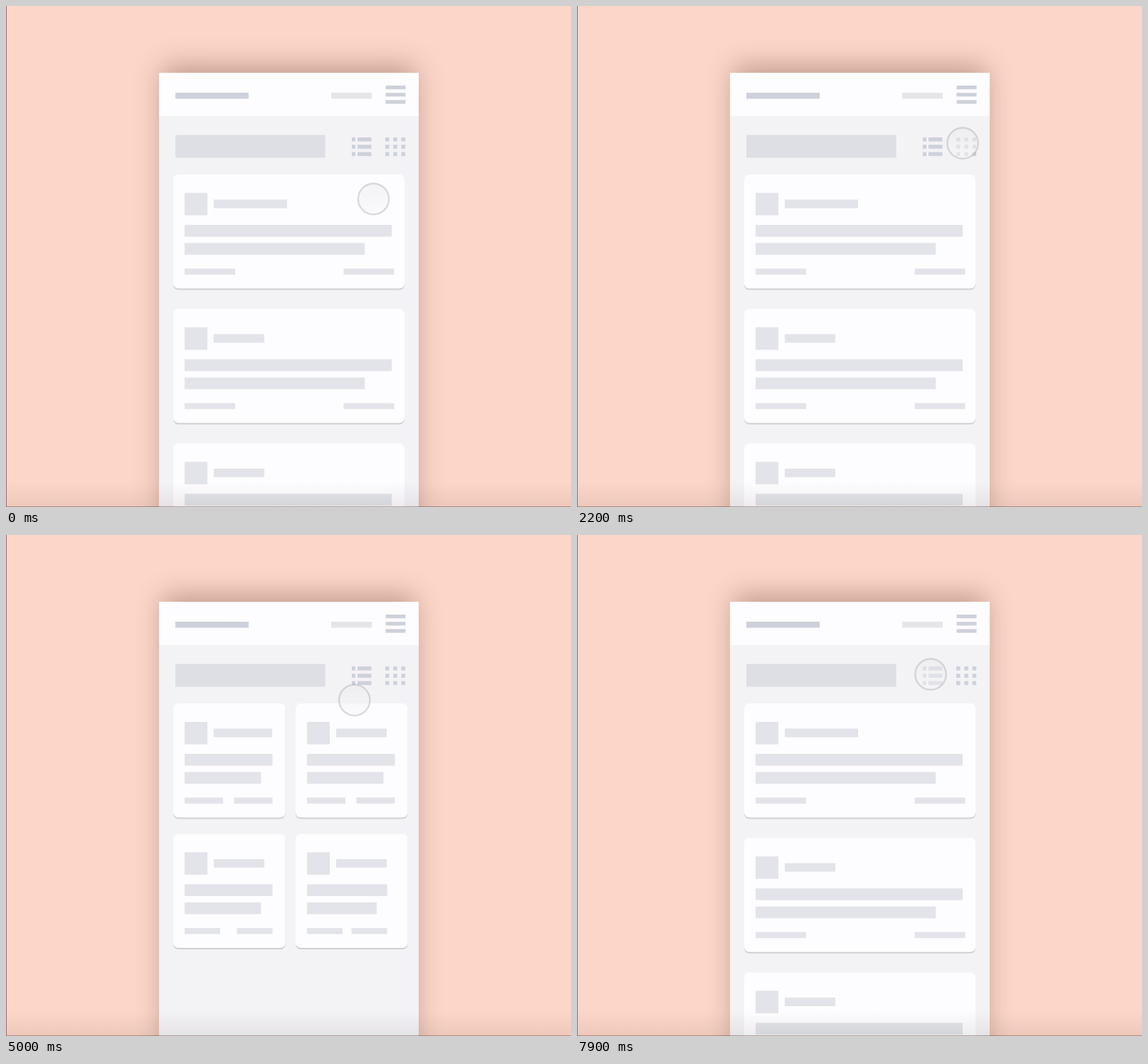
Write an HTML page with a canvas that moves like this. It is 794 px wide and 705 px high and loops after 8 s.

```html
<!DOCTYPE html>
<html lang="en">
<head>
<meta charset="utf-8">
<title>Mobile wireframe</title>
<style>
html, body { margin: 0; width: 100%; height: 100%; overflow: hidden; background: #fcd6c8; }
canvas { display: block; }
</style>
</head>
<body>
<canvas id="stage" width="794" height="705"></canvas>
<script>
const W = 794, H = 705, LOOP = 8000, STEP = 100;
const ctx = document.getElementById('stage').getContext('2d');
const WHITE = '#fdfcfe', SCREEN = '#f3f2f5', BAR = '#e2e4e9', DARK = '#cdd1db', BLOCK = '#dddfe4', MID = '#d1d4db';
const PHONE = { x: 215, y: 94, w: 365 }, MARGIN = 235, FULL = 325, HALF = 157.5;

// Places the pointer visits, and when it travels there
const START = { x: 516.5, y: 271.5 }, MENU = { x: 549, y: 131 }, CARD = { x: 333, y: 257 };
const GRID_ICON = { x: 542, y: 193 }, LIST_ICON = { x: 505.5, y: 193 }, LIST_EDGE = { x: 497, y: 196 };
const MOVES = [
  { from: 400, to: 800, spot: MENU },
  { from: 1800, to: 2200, spot: GRID_ICON },
  { from: 3100, to: 3600, spot: LIST_ICON },
  { from: 4000, to: 4400, spot: GRID_ICON },
  { from: 4700, to: 5600, spot: CARD, arc: 33 },
  { from: 6300, to: 7500, spot: LIST_EDGE }
];
const TAPS = [900, 2500, 4400, 7600];

const lerp = (a, b, p) => a + (b - a) * p;
const span = (t, a, b) => Math.min(1, Math.max(0, (t - a) / (b - a)));
const ease = (t, a, b) => (1 - Math.cos(Math.PI * span(t, a, b))) / 2;
const easeOut = (t, a, b) => 1 - (1 - span(t, a, b)) ** 3;

function rect(x, y, w, h, color) {
  ctx.fillStyle = color;
  ctx.fillRect(x, y, w, h);
}

function shade(y, h, from, to) {
  const g = ctx.createLinearGradient(0, y, 0, y + h);
  g.addColorStop(0, from);
  g.addColorStop(1, to);
  return g;
}

function clipped(x, y, w, h, draw) {
  ctx.save();
  ctx.beginPath();
  ctx.rect(x, y, w, h);
  ctx.clip();
  draw();
  ctx.restore();
}

function rounded(x, y, w, h, color) {
  ctx.fillStyle = color;
  ctx.beginPath();
  ctx.roundRect(x, y, w, h, 7);
  ctx.fill();
}

function background() {
  rect(0, 0, W, H, '#fcd6c8');
  ctx.save();
  ctx.shadowColor = 'rgba(85,50,35,.38)';
  ctx.shadowBlur = 36;
  ctx.shadowOffsetY = -8;
  rect(PHONE.x + 6, PHONE.y, PHONE.w - 12, H, SCREEN);
  ctx.restore();
}

// Two lines of text, the second a little shorter
function lines(x, y, w, color) {
  rect(x, y, w, 16.5, color);
  rect(x, y + 25.5, w * .87, 16.5, color);
}

function card(x, y, w, name, inner, foot, footEnd) {
  rounded(x, y + 2, w, 160.5, '#cfd0d5');
  rounded(x, y, w, 160.5, WHITE);
  const left = x + 16;
  rect(left, y + 26, 32, 31.5, BAR);
  rect(left + 41, y + 35.5, name, 12, BAR);
  lines(left, y + 71, inner, BAR);
  rect(left, y + 132.5, foot, 8.5, BAR);
  rect(left + footEnd - foot, y + 132.5, foot, 8.5, BAR);
}

// Left cards shrink to half width while the right column slides in
function cards(grid, reading) {
  for (let col = 0; col < 2; col++) {
    for (let row = 0; row < 3 - col; row++) {
      const x = MARGIN + col * (172 + 193 * (1 - grid) + 190 * reading);
      const y = 237 + row * lerp(189.25, 183.5, grid) + (row > 1 ? 120 * grid : 0);
      const w = col ? HALF : lerp(FULL, HALF, grid);
      const inner = w - 34 - 11 * row * col;
      const name = row + col ? 71 : lerp(103, 82, grid);
      const foot = lerp(71, 54 - 4 * row, grid);
      card(x, y, w, name, inner, foot, inner + 3.5 * (1 - grid));
    }
  }
}

function toolbar() {
  rect(238, 181.5, 210.5, 32, BLOCK);
  for (let row = 0; row < 3; row++) {
    const y = 185 + row * 10.3;
    rect(486, y, 5, 5.5, DARK);
    rect(494, y, 19.5, 5.5, DARK);
    for (let col = 0; col < 3; col++) rect(533 + col * 11.3, y, 5.5, 5.5, DARK);
  }
}

function article(alpha, heroWidth) {
  const left = MARGIN + 16, text = '#dfe3e8';
  ctx.globalAlpha = alpha;
  rect(MARGIN, 177.5, FULL, H, WHITE);
  clipped(MARGIN, 177.5, heroWidth, 170, () => {
    rect(MARGIN, 177.5, FULL, 170, BAR);
    lines(left, 288, 291, WHITE);
  });
  rect(left, 374, 103, 8.5, text);
  for (let i = 0; i < 8; i++) {
    const indent = 2 - Math.abs(2 - i % 4);
    rect(left, 405 + i * 24.5, 291 - 9.6 * indent, 16.5, text);
  }
  rect(303, 637, 191.5, 47.5, MID);
  rect(327, 655.5, 147.5, 11.5, WHITE);
  ctx.globalAlpha = 1;
}

function menu(open) {
  const { x, y, w } = PHONE, bottom = 155 + 559 * open;
  rect(x, 155, w, H, `rgba(60,60,70,${.11 * open})`);
  rect(x, bottom, w, 11, shade(bottom, 11, 'rgba(60,60,65,.22)', 'rgba(60,60,65,0)'));
  clipped(x, y, w, bottom - y, () => {
    rect(x, y, w, H, '#faf9fc');
    for (let i = 0; i < 4; i++) {
      rect(238, 167 + i * 63.9, 315 + 7 * Math.cos(1.45 * i), 54.5, BLOCK);
      rect(239.5 + i * 48.2, 429, 31, 26, MID);
    }
  });
}

// The three bars turn into a cross as the menu opens
function menuIcon(open) {
  const turn = Math.min(1, open / .93);
  for (const side of [-1, 0, 1]) {
    ctx.save();
    ctx.translate(547.5, 124.8 + side * 10.2 * (1 - turn));
    ctx.rotate(-side * turn * .72);
    const w = side ? 28 + 9 * turn : 28 * (1 - turn);
    rect(-w / 2, -2.6, w, 5.2, DARK);
    ctx.restore();
  }
}

function pointer(t) {
  let { x, y } = START, r = 21.7;
  for (const { from, to, spot, arc = 0 } of MOVES) {
    const p = ease(t, from, to);
    x = lerp(x, spot.x, p);
    y = lerp(y, spot.y, p) + arc * Math.sin(Math.PI * p);
  }
  for (const tap of TAPS) r *= 1 - .1 * Math.sin(Math.PI * span(t, tap, tap + 300));
  ctx.beginPath();
  ctx.arc(x, y, r, 0, 7);
  ctx.fillStyle = shade(y - r, 2 * r, 'rgba(234,234,236,.5)', 'rgba(248,248,249,.5)');
  ctx.fill();
  ctx.strokeStyle = 'rgba(150,150,154,.33)';
  ctx.lineWidth = 2.4;
  ctx.stroke();
}

function draw(t) {
  const grid = t < 3900 ? ease(t, 2500, 3000) : ease(t, 4400, 4800) - ease(t, 7600, 7900);
  const reading = ease(t, 5400, 5800) - ease(t, 6500, 7100);
  const open = easeOut(t, 900, 1400) - ease(t, 1600, 2100);
  const { x, y, w } = PHONE;

  background();
  clipped(x, y, w, H, () => {
    rect(x, y, w, H, SCREEN);
    ctx.globalAlpha = 1 - reading;
    toolbar();
    cards(grid, reading);
    ctx.globalAlpha = 1;
    if (reading > 0) article(reading, lerp(HALF, FULL, span(t, 5600, 5900)));
    rect(x, y, w, 61, WHITE);
    rect(457, 122, 57, 8.5, '#e5e6ea');
    if (open > 0) menu(open);
    rect(238, 122, 103, 8.5, DARK);
    menuIcon(open);
  });
  pointer(t);

  rect(0, 670, W, 35, shade(670, 35, 'rgba(60,45,40,0)', 'rgba(60,45,40,.08)'));
  rect(0, H - 1, W, 1, 'rgba(80,40,30,.4)');
  rect(0, 0, 1, H, '#8f6f66');
}

// The motion runs at ten pictures a second
function loop(now) {
  draw(Math.floor(now % LOOP / STEP) * STEP);
  requestAnimationFrame(loop);
}
requestAnimationFrame(loop);
</script>
</body>
</html>
```
